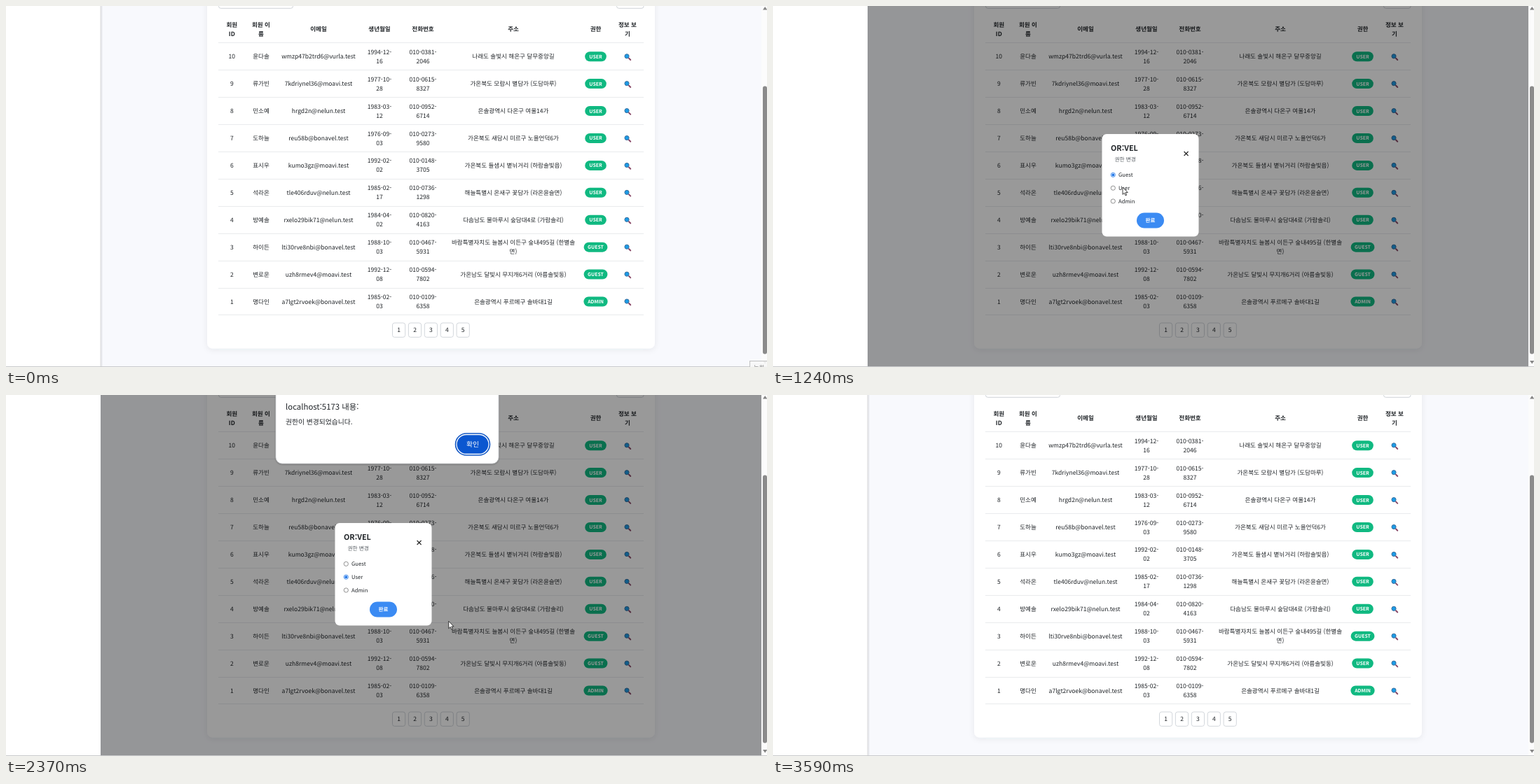
Animation of 1086x516 px, one loop 4 s. Source, as an HTML page:

```html
<!DOCTYPE html>
<html lang="ko">
<head>
<meta charset="utf-8">
<title>회원 권한 변경</title>
<style>
  html, body { margin: 0; width: 100%; height: 100%; overflow: hidden; background: #f8f9fd; }
  svg { display: block; width: 1086px; height: 516px; }
  text { font: 8.55px "Noto Sans CJK KR", "Noto Sans CJK", "Noto Sans", sans-serif; fill: #212529; white-space: pre; text-rendering: geometricPrecision; }
  .mid { text-anchor: middle; }
  .head { font-weight: 700; }
  .tag { font-size: 6.9px; font-weight: 700; fill: #fff; }
  .small { font-size: 7.7px; }
</style>
</head>
<body>
<svg id="stage" viewBox="0 0 1086 516" xmlns="http://www.w3.org/2000/svg">
  <defs>
    <linearGradient id="edge"><stop stop-color="#000" stop-opacity=".13"/><stop offset="1" stop-color="#000" stop-opacity="0"/></linearGradient>
    <filter id="soft" x="-10%" y="-10%" width="120%" height="120%"><feDropShadow dx="0" dy="2" stdDeviation="4" flood-color="#23304a" flood-opacity=".07"/></filter>
    <filter id="lift" x="-10%" y="-20%" width="120%" height="150%"><feDropShadow dx="0" dy="1" stdDeviation="1.3" flood-opacity=".3"/></filter>
    <g id="lens">
      <path d="M2 2L4.2 4.2" stroke="#8a4a68" stroke-width="2" stroke-linecap="round"/>
      <circle cx="-1" cy="-1" r="3.1" fill="#1c9be6" stroke="#40719e" stroke-width="1"/>
    </g>
  </defs>

  <rect width="1086" height="516" fill="#f8f9fd"/>
  <rect x="287" y="-20" width="639" height="509.5" rx="8" fill="#fff" filter="url(#soft)"/>
  <g fill="#fff" stroke="#cfd3d8">
    <rect x="303.5" y="-15" width="106" height="18.3" rx="3"/>
    <rect x="871.5" y="-15" width="38.5" height="18.3" rx="3"/>
  </g>
  <g id="table"></g>
  <rect id="shade" x="135" width="943" height="515" opacity=".4"/>
  <rect width="135" height="516" fill="#fff"/>
  <rect id="edgeLine" x="134.5" width="4" height="516" fill="url(#edge)"/>

  <rect x="1078" width="8" height="516" fill="#fcfcfc"/>
  <rect x="1080" y="114.5" width="6" height="383" rx="3" fill="#8b8b8b"/>
  <path d="M1080 5.5L1083.2 1L1086.4 5.5ZM1080 507L1083.2 511.5L1086.4 507Z" fill="#858585"/>
  <rect y="515" width="1086" height="1" fill="#c9cacc"/>

  <g id="modal">
    <rect x="469.5" y="183" width="138" height="146.5" rx="6.5" fill="#fff"/>
    <text x="482" y="207" style="font-size:10.8px;font-weight:700">OR:VEL</text>
    <text x="487.5" y="221.6" class="small" style="fill:#555b61">권한 변경</text>
    <path d="M586.6 208l6 6m0-6l-6 6" stroke="#222" stroke-width="1.1"/>
    <g id="radios"></g>
    <rect x="519" y="295.5" width="39" height="22" rx="11" fill="#3b8bf3"/>
    <text x="538.5" y="309.3" class="mid" style="font-size:7.5px;font-weight:700;fill:#fff">완료</text>
  </g>

  <g id="alert">
    <rect x="385" y="-40" width="318" height="138" rx="9" fill="#fff" stroke="#c8cacd" stroke-width=".7" filter="url(#lift)"/>
    <text x="399" y="21" style="font-size:11.4px">localhost:5173 내용:</text>
    <text x="399" y="42.4" style="font-size:9.8px">권한이 변경되었습니다.</text>
    <rect x="641.5" y="55" width="49" height="31" rx="15.5" fill="#fff" stroke="#1257c4" stroke-width="1.6"/>
    <rect id="ok" x="643.6" y="57.2" width="44.8" height="26.6" rx="13.3" fill="#0b57d0"/>
    <text x="666" y="74" class="mid" style="font-size:9.8px;fill:#fff">확인</text>
  </g>

  <g id="tip">
    <rect x="1061.5" y="507.5" width="30" height="14" fill="#f8f8f8" fill-opacity=".9" stroke="#c0c0c0"/>
    <text x="1067" y="519.5" style="fill:#888">녹화</text>
  </g>

  <circle id="pulse" fill="#fff03c" fill-opacity=".6"/>
  <g id="cursor" stroke-linejoin="round">
    <path id="arrow" d="M0 0V10.4L2.4 8.2L4 11.9L5.7 11.2L4.1 7.6H7.3Z" fill="#fff" stroke="#111" stroke-width=".8"/>
    <path id="hand" d="M-.9 7.2V1Q-.9 0 0 0T.9 1V4.6Q1.8 4 2.5 4.9Q3.4 4.4 4 5.3Q5.3 5 5.4 6.5V9Q5.3 11 4.2 12.6H-.8Q-2 10.5-3.5 8.4Q-3.9 7-2.5 6.7Z" fill="#fff" stroke="#111" stroke-width=".8"/>
  </g>
</svg>

<script>
const $ = id => document.getElementById(id);
const LOOP = 4000, PITCH = 38.92;
const COLS = [322.3, 364, 446, 533, 595, 724, 841.5, 887];

function add(parent, tag, attrs, content) {
  const el = document.createElementNS("http://www.w3.org/2000/svg", tag);
  for (const k in attrs) el.setAttribute(k, attrs[k]);
  if (content) el.textContent = content;
  parent.append(el);
  return el;
}

// Centred cell; "|" breaks the line.
function cell(x, y, content, cls = "") {
  const lines = content.split("|");
  lines.forEach((s, i) => add($("table"), "text",
    { x, y: y + 3.1 + (i - (lines.length - 1) / 2) * 13, class: "mid " + cls }, s));
}

function badge(y, role) {
  const g = add($("table"), "g", {});
  const w = { USER: 30.6, GUEST: 33.8, ADMIN: 34.2 }[role];
  add(g, "rect", { x: COLS[6] - w / 2, y: y - 7, width: w, height: 14, rx: 7, fill: "#10b981" });
  add(g, "text", { x: COLS[6], y: y + 2.5, class: "mid tag" }, role);
  return g;
}

const rule = y => add($("table"), "path", { d: `M303 ${Math.floor(y) + .5}H910`, stroke: "#e9ebed" });

const ROWS = [
  ["윤다솔", "wmzp47b2trd6@vurla.test", "1994-12-|16", "010-0381-|2046", "나래도 솔빛시 해온구 달무중앙길"],
  ["류가빈", "7kdriynel36@moavi.test", "1977-10-|28", "010-0615-|8327", "가온북도 모람시 별담가 (도담마루)"],
  ["민소예", "hrgd2n@nelun.test", "1983-03-|12", "010-0952-|6714", "은솔광역시 다온구 여울14가"],
  ["도하늘", "reu58b@bonavel.test", "1976-09-|03", "010-0273-|9580", "가온북도 새담시 미르구 노을언덕6가"],
  ["표시우", "kumo3gz@moavi.test", "1992-02-|02", "010-0148-|3705", "가온북도 들샘시 볕뉘거리 (하람솔빛읍)"],
  ["석라온", "tle406rduv@nelun.test", "1985-02-|17", "010-0736-|1298", "해늘특별시 온새구 꽃담가 (라온윤슬면)"],
  ["방예솔", "rxelo29bik71@nelun.test", "1984-04-|02", "010-0820-|4163", "다솜남도 물마루시 숲담대4로 (가람솔리)"],
  ["하이든", "lti30rve8nbi@bonavel.test", "1988-10-|03", "010-0467-|5931", "바람특별자치도 늘봄시 이든구 숲내495길 (한별솔|면)"],
  ["변로운", "uzh8rmev4@moavi.test", "1992-12-|08", "010-0594-|7802", "가온남도 달빛시 무지개6거리 (아름솔빛동)"],
  ["명다인", "a7lgt2rvoek@bonavel.test", "1985-02-|03", "010-0109-|6358", "은솔광역시 푸르메구 솔바대1길"]
];
const ROLES = { 7: "GUEST", 8: "GUEST", 9: "ADMIN" };

["회원|ID", "회원 이|름", "이메일", "생년월일", "전화번호", "주소", "권한", "정보 보|기"]
  .forEach((s, i) => cell(COLS[i], 33.1, s, "head"));
rule(52.6);

let before, after;
ROWS.forEach((row, i) => {
  const y = 72.2 + i * PITCH;
  [String(10 - i), ...row].forEach((s, c) => cell(COLS[c], y, s));
  const b = badge(y, ROLES[i] || "USER");
  if (i === 8) { before = b; after = badge(y, "USER"); }
  add($("table"), "use", { href: "#lens", x: COLS[7], y: y + .6 });
  rule(y + 19.5);
});

for (let i = 0; i < 5; i++) {
  const x = 560.6 + i * 22.9;
  add($("table"), "rect", { x: x - 9.1, y: 453, width: 18.2, height: 20.4, rx: 3, fill: "#fff", stroke: "#cfd3d8", "stroke-width": .9 });
  cell(x, 463.1, String(i + 1));
}

const dots = ["Guest", "User", "Admin"].map((name, i) => {
  const y = 241.4 + i * 18.8, g = $("radios");
  const ring = add(g, "circle", { cx: 485.3, cy: y, r: 3.1, fill: "#fff", "stroke-width": .8 });
  const dot = add(g, "circle", { cx: 485.3, cy: y, r: 1.9, fill: "#1a73e8" });
  add(g, "text", { x: 493, y: y + 2.9, class: "small" }, name);
  return { ring, dot };
});

// Pointer stops: time, x, y
const PATH = [
  [30, 1074, 513], [520, 843, 381], [770, 843, 381], [1110, 499, 259],
  [1400, 499, 259], [1710, 519, 304], [1760, 521, 306], [1950, 535, 309],
  [2150, 535, 309], [2280, 630, 336], [2310, 630, 336], [2770, 666, 72],
  [2990, 666, 72], [3360, 971, 509], [3590, 1010, 518]
];
// Dialog stops: time, offset, opacity
const DIALOG = [
  [2070, -20, 0], [2130, -5.7, .75], [2220, 0, 1], [2950, 0, 1], [3070, -14, 0]
];
const CLICKS = [650, 1250, 2000, 2835];

const smooth = p => p * p * (3 - 2 * p);
const linear = p => p;

function at(stops, t, ease) {
  if (t <= stops[0][0]) return stops[0].slice(1);
  const i = stops.findIndex(s => s[0] > t);
  if (i < 0) return stops[stops.length - 1].slice(1);
  const a = stops[i - 1], b = stops[i];
  const p = ease((t - a[0]) / (b[0] - a[0]));
  return a.slice(1).map((v, k) => v + (b[k + 1] - v) * p);
}

const show = (el, on) => el.style.display = on ? "" : "none";
const within = (t, a, b) => t >= a && t < b;

function draw(t) {
  const open = within(t, 740, 2920);
  show($("shade"), open);
  show($("modal"), open);
  show($("edgeLine"), !open);
  show(before, t < 2920);
  show(after, t >= 2920);
  show($("tip"), t < 30);

  const picked = t < 1320 ? 0 : 1;
  dots.forEach(({ ring, dot }, i) => {
    show(dot, i === picked);
    ring.setAttribute("stroke", i === picked ? "#1a73e8" : "#767676");
  });

  const [x, y] = at(PATH, t, smooth);
  const [dy, alpha] = at(DIALOG, t, linear);
  show($("alert"), alpha > 0);
  $("alert").setAttribute("transform", `translate(0 ${dy})`);
  $("alert").setAttribute("opacity", alpha);
  const over = within(t, 2310, 2990) && y < 84 && x > 644;
  $("ok").setAttribute("fill", over ? "#1f60c6" : "#0b57d0");

  const hand = t < 740 ? x < 858 : within(t, 1735, 2200) && x < 558;
  show($("cursor"), t >= 30 && t < 3590 && !within(t, 2920, 2960));
  show($("hand"), hand);
  show($("arrow"), !hand);
  $("cursor").setAttribute("transform", `translate(${x} ${y})`);

  const start = CLICKS.find(c => within(t, c, c + 125));
  show($("pulse"), start !== undefined);
  if (start !== undefined) {
    $("pulse").setAttribute("cx", x);
    $("pulse").setAttribute("cy", y);
    $("pulse").setAttribute("r", t - start < 85 ? 8.8 : 2.5);
  }
}

function tick() {
  draw(performance.now() % LOOP);
  requestAnimationFrame(tick);
}
tick();
</script>
</body>
</html>
```
